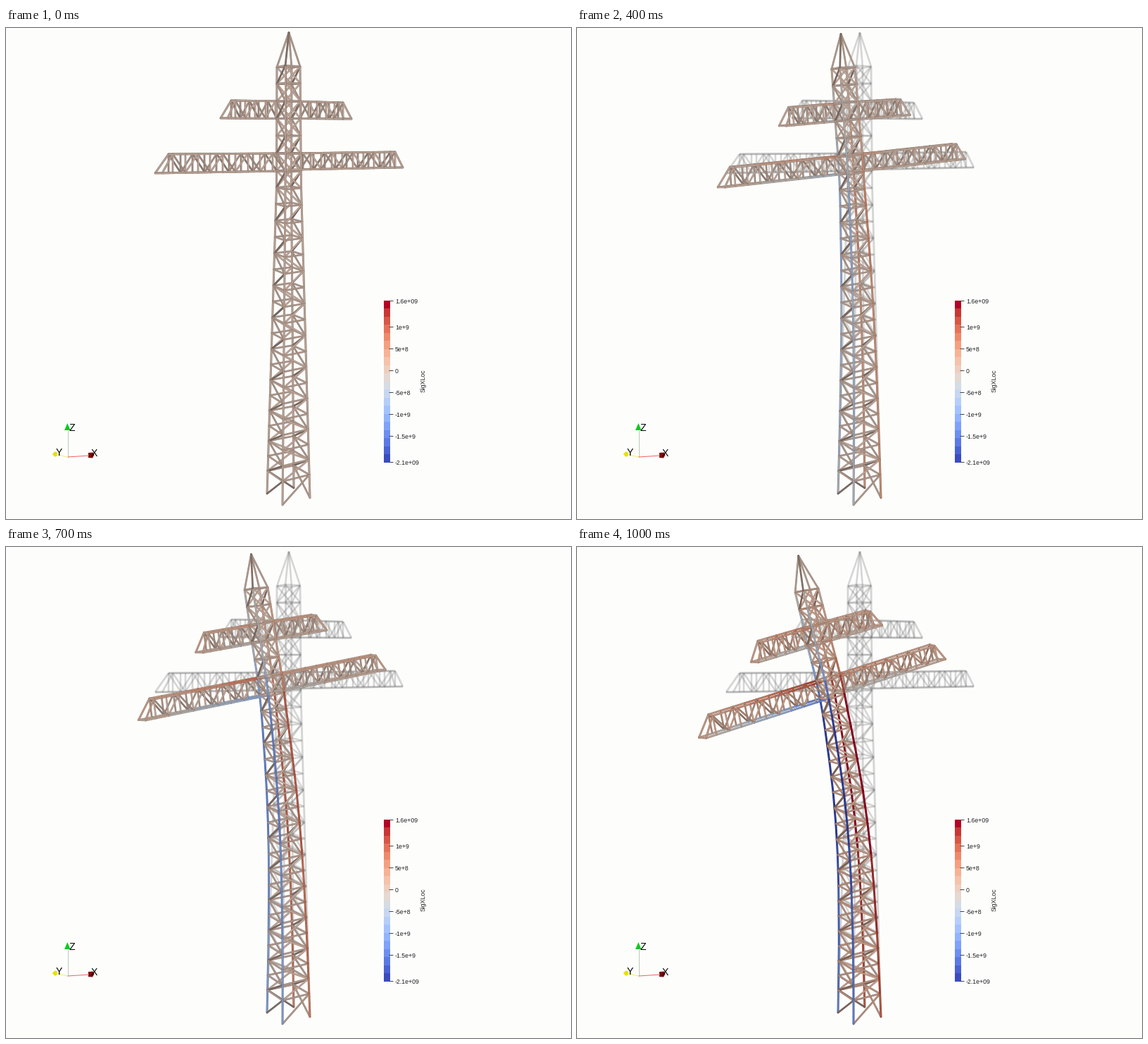
These frames come from a looping animation (803 px wide and 697 px high, 1.1 s). A matplotlib script:

```python
import numpy as np
import matplotlib as mpl
import matplotlib.pyplot as plt
from matplotlib.animation import FuncAnimation
from matplotlib.collections import LineCollection
from matplotlib.patches import Ellipse, Polygon, Rectangle

W, H, DPI = 803, 697, 100
PX = 72 / DPI
FRAMES = 11
S_MIN, S_MAX = -2.1e9, 1.6e9
CMAP = mpl.colormaps["coolwarm"].resampled(20)

# The small margin keeps the pixel size from rounding down
fig = plt.figure(figsize=((W + 0.01) / DPI, (H + 0.01) / DPI), dpi=DPI,
                 facecolor="#fdfefc")
ax = fig.add_axes([0, 0, 1, 1])
ax.set_xlim(0, W)
ax.set_ylim(H, 0)
ax.axis("off")

# Legs: a = back left, b = front left, c = front right, d = back right
LEG_X = {"a": (385, 384.5, 371), "b": (397, 397, 393),
         "c": (418, 419.5, 432), "d": (406, 405.5, 409)}
LEG_DY = {"a": -3.5, "b": 12.5, "c": 2.5, "d": -11.5}
AXIS = {"a": 395.5, "d": 395.5, "b": 407.5, "c": 407.5}
HORIZON, BASE = 130, 664.5

bars = []  # (start, end, stress, shade, width)


def node(leg, y):
    x = np.interp(y, (55, 225, BASE), LEG_X[leg])
    return x, y + LEG_DY[leg] * (y - HORIZON) / (BASE - HORIZON), AXIS[leg]


def bar(p, q, stress=0.14e9, shade=1.0, width=2.5):
    bars.append((p, q, stress, shade, width))


def leg_stress(leg, y):
    k = np.interp(y, (55, 130, 190, 225, 340, BASE), (0.05, .2, .65, 1, 1, .62))
    return k * (S_MIN if leg in "ab" else S_MAX)


levels = [55, 79, 104, 128.5, 153, 178]
levels += [203 + 23.95 * k - 0.0726 * k * k for k in range(20)] + [BASE]
LAST = len(levels) - 2


def leg_line(leg):
    for y0, y1 in zip(levels, levels[1:]):
        bar(node(leg, y0), node(leg, y1), leg_stress(leg, (y0 + y1) / 2), 1, 2.9)


def face(l, r, wide):
    for k, (y0, y1) in enumerate(zip(levels, levels[1:])):
        bar(node(l, y0), node(r, y0), shade=0.95)
        rising = (node(l, y1), node(r, y0))
        falling = (node(l, y0), node(r, y1))
        if k == LAST:
            ends = rising if (l, r) in (("a", "b"), ("b", "c")) else falling
            bar(*ends, shade=0.68 if l == "a" else 0.95)
            continue
        cross = wide and y0 < 210
        if cross or k % 2 == 0:
            bar(*rising, shade=1.04 if wide else 0.66)
        if cross or k % 2:
            bar(*falling, shade=1.04 if wide else 0.92)


def arm_side(root, tip, top, ys, leg, n, pull, push, shade):
    """One truss plane of a cross arm, from the mast out to its tip."""
    y_top, y_bot = ys
    axis = AXIS[leg]
    t = np.linspace(0, 1, n + 1)
    xs = root + (top[0] - root) * t
    bot_y = y_bot + (tip[1] - y_bot) * (xs - root) / (tip[0] - root)
    up = [(x, y, axis) for x, y in zip(xs, y_top + (top[1] - y_top) * t)]
    low = [(x, y, axis) for x, y in zip(xs, bot_y)]
    end = (*tip, axis)
    for k in range(n):
        if k % 2:
            bar(up[k], low[k + 1], shade=shade)
        else:
            bar(low[k], up[k + 1], shade=shade * 0.85)
        bar(up[k + 1], low[k + 1], shade=shade)
        fade = (1 - t[k]) ** 1.3
        bar(low[k], low[k + 1], push * fade, 1, 2.8)
        bar(up[k], up[k + 1], 0.2e9 + pull * fade, 1, 2.8)
    bar(low[-1], end, 0.1e9, 1, 2.8)
    bar(up[-1], end, 0.3e9, 1, 2.8)
    return up[-1], end


def arm(tip, top, ys, n, left, pull=0.1e9, push=0.0):
    shift = 10 if left else 11
    back, front = ("a", "b") if left else ("d", "c")
    ends = []
    for leg in (back, front):
        dx = 0
        if left and leg == front:
            dx = shift
        if not left and leg == back:
            dx = -shift
        root = LEG_X[leg][0]
        shade = 0.9 if leg == back else 1.02
        ends.append(arm_side(root, (tip[0] + dx, tip[1]), (top[0] + dx * .6, top[1]),
                             ys, leg, n, pull, push, shade))
    for p, q in zip(*ends):
        bar(p, q)


leg_line("d")
face("a", "d", True)
face("d", "c", False)
leg_line("a")
arm((305, 128), (320, 103), (104, 128.5), 5, True, 0.35e9, -0.3e9)
arm((491, 129), (479, 106), (104, 128.5), 5, False)
arm((212, 206), (231, 179), (178, 203), 9, True, 0.95e9, -1.3e9)
arm((564, 198), (553, 176), (178, 201), 9, False, 0.25e9, -0.2e9)
face("a", "b", False)
face("b", "c", True)
leg_line("c")
leg_line("b")
for leg in "dacb":
    bar(node(leg, 55), (402, 6.5, 402), 0.1e9, 0.72 if leg == "b" else 0.95, 2.6)

ends = np.array([(p, q) for p, q, *_ in bars], float)
stress, shade, width = (np.array(v) for v in list(zip(*bars))[2:])


def mode_shape(pts):
    """Sway of each node at full load."""
    x, y, axis = np.moveaxis(pts, -1, 0)
    ux = -np.interp(y, (6, 55, 103, 128, 178, 203, 250, 300, 345, 390, 434, 479, 560, 661),
                    (87.5, 75, 63, 57.5, 44.5, 39.2, 31, 23, 16.5, 11.4, 7.6, 4.9, 1.8, 0))
    rot = np.interp(y, (55, 100, 206, 300, 345, 480, 661),
                    (.22, .305, .305, .18, .145, .06, 0))
    drop = np.interp(y, (6, 55, 115, 200, 345, 661), (6, 6.5, 7.4, 9, 3, 0))
    return np.stack([ux, drop - rot * (x - axis)], axis=-1)


rest = ends[..., :2]
sway = mode_shape(ends)


def load(i):
    return (5.8 * i + 0.2 * i ** 2 + 0.0095 * i ** 3) / 87.5


def tint(i):
    rgb = CMAP((stress * load(i) - S_MIN) / (S_MAX - S_MIN))[:, :3]
    edge = rgb * (0.62 * shade)[:, None]
    core = rgb * (0.79 * shade)[:, None]
    return np.clip(np.stack([edge, core], 1).reshape(-1, 3), 0, 1)


ax.add_collection(LineCollection(rest, linewidths=width * PX, colors="#808080",
                                 alpha=0.32, zorder=1))
tower = LineCollection(np.repeat(rest, 2, axis=0), zorder=2, capstyle="round",
                       linewidths=np.stack([width, width * 0.55], 1).ravel() * PX)
ax.add_collection(tower)


def text(x, y, s, size, **kw):
    ax.text(x, y, s, fontsize=size * PX, family="Liberation Sans",
            va="center_baseline" if "rotation" not in kw else "center", **kw)


def line(p, q, color, w=1.0):
    ax.plot(*zip(p, q), color=color, lw=w * PX, solid_capstyle="butt")


# Colour scale
TOP, BOTTOM = 387, 616.5
step = (BOTTOM - TOP) / 20
for k in range(20):
    ax.add_patch(Rectangle((537, TOP + k * step), 9, step + 0.2, lw=0, color=CMAP(19 - k)))
for value, label in ((1.6e9, "1.6e+09"), (1e9, "1e+9"), (5e8, "5e+8"), (0, "0"),
                     (-5e8, "-5e+8"), (-1e9, "-1e+9"), (-1.5e9, "-1.5e+9"),
                     (-2.1e9, "-2.1e+09")):
    y = TOP + (S_MAX - value) / (S_MAX - S_MIN) * (BOTTOM - TOP)
    line((544, y), (550, y), "#444444")
    text(553, y, label, 8.8, color="#222222")
text(593.5, 501, "SigXLoc", 8.8, color="#222222", rotation=90, ha="center")

# Axis triad
ORIGIN = (87.5, 609)
line(ORIGIN, (87.5, 570), "#b9c9b9")
line(ORIGIN, (118, 607), "#f06060")
line(ORIGIN, (72, 605.5), "#eeee70")
ax.add_patch(Polygon([(83, 571), (91.5, 571), (87.3, 561)], color="#10c820", lw=0))
ax.add_patch(Polygon([(117, 603), (124, 602.5), (125.5, 606), (123, 610.5), (117, 610)],
                     color="#7c0808", lw=0))
ax.add_patch(Polygon([(65.5, 605), (72, 602), (72, 608)], color="#c8c010", lw=0))
ax.add_patch(Ellipse((70, 605), 6, 7, color="#e8e000", lw=0))
for x, y, s in ((93.5, 566, "Z"), (125, 602.5, "X"), (75, 601, "Y")):
    text(x, y, s, 14, color="black", ha="center")


def draw(i):
    tower.set_segments(np.repeat(rest + sway * load(i), 2, axis=0))
    tower.set_color(tint(i))
    return (tower,)


anim = FuncAnimation(fig, draw, frames=FRAMES, init_func=lambda: draw(0),
                     interval=100, repeat=True, repeat_delay=0)
plt.show()
```
